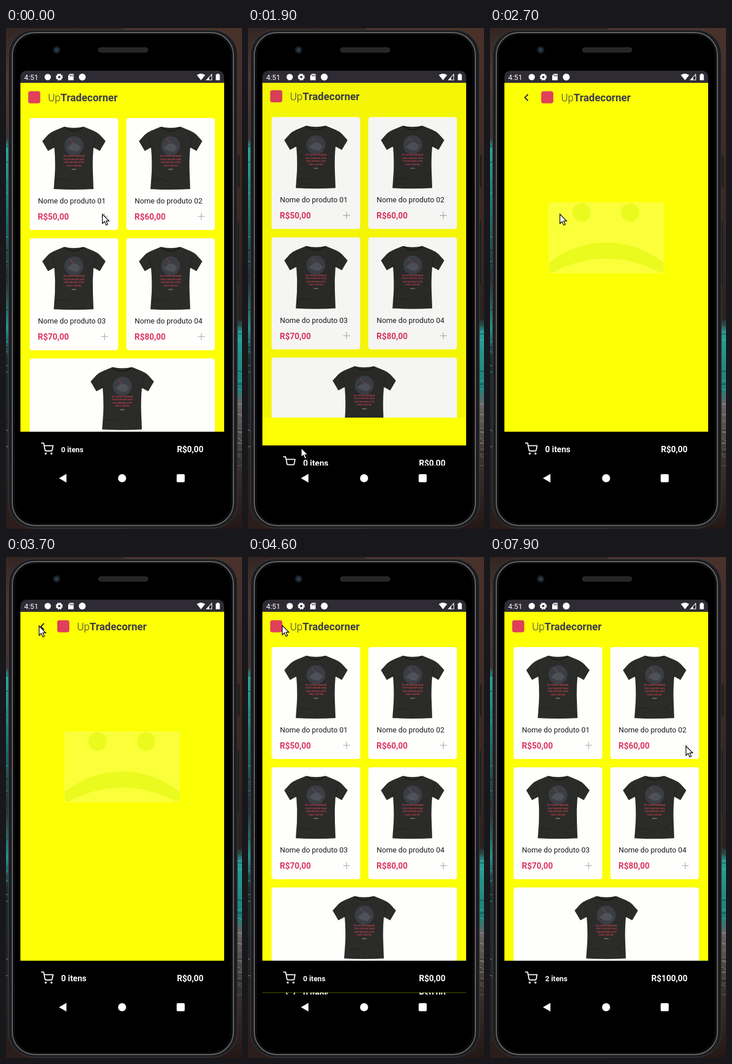
Write an HTML page that moves like this. It is 410 px wide and 868 px high and loops after 8 s.

```html
<!DOCTYPE html>
<html lang="pt">
<head>
<meta charset="utf-8">
<title>Loja</title>
<style>
html, body { margin: 0; width: 100%; height: 100%; overflow: hidden; background: #000; }
svg { display: block; width: 410px; height: 868px; font-family: Roboto, sans-serif; }
.title { font-size: 18px; font-weight: 300; fill: #3d3d4d; }
.title tspan, .price, .total { font-weight: 700; }
.name { font-size: 12.85px; fill: #1c1c22; }
.price { font-size: 14.4px; fill: #dc3560; }
.total { font-size: 14.5px; fill: #fff; }
.print { font: 700 3.5px "Liberation Sans", sans-serif; fill: #c0404f; text-anchor: middle; }
</style>
</head>
<body>
<svg id="stage" viewBox="0 0 410 868"></svg>
<script>
const LOOP = 8000, STEP = 100;
const TOP = 95, HEIGHT = 663;
const OPEN_AT = 1865, CLOSE_AT = 4230, DURATION = 438;
const YELLOW = '#fdff05';
const stage = document.getElementById('stage');

const defs = `
<linearGradient id="left" x2="0" y2="1">
  <stop offset="0" stop-color="#332622"/><stop offset=".1" stop-color="#4c3b35"/>
  <stop offset=".22" stop-color="#40332f"/><stop offset=".24" stop-color="#2aa59b"/>
  <stop offset=".4" stop-color="#1d6663"/><stop offset=".5" stop-color="#26302f"/>
  <stop offset=".6" stop-color="#2a8f87"/><stop offset=".66" stop-color="#1c2f30"/>
  <stop offset="1" stop-color="#2b1d1a"/>
</linearGradient>
<linearGradient id="right" x2="0" y2="1">
  <stop offset="0" stop-color="#4a322b"/><stop offset=".35" stop-color="#3b2822"/>
  <stop offset=".58" stop-color="#2b2220"/><stop offset=".61" stop-color="#27a098"/>
  <stop offset=".72" stop-color="#1d7f7a"/><stop offset=".75" stop-color="#6a6663"/>
  <stop offset=".87" stop-color="#3a302d"/><stop offset="1" stop-color="#241816"/>
</linearGradient>
<clipPath id="screen"><rect x="25" y="${TOP}" width="354" height="${HEIGHT}"/></clipPath>
<clipPath id="reveal"><rect id="revealBox" x="25" width="354" height="${HEIGHT}"/></clipPath>
<g id="shirt">
  <path fill="#2b2b29" d="M-17 0Q0 4 17 0L34 7Q41 10 45 14L55 25 45 42 34 36Q32 58 33 80L34 108Q0 110-35 108L-33 80Q-32 58-34 36L-45 42-55 25-45 14Q-41 10-34 7Z"/>
  <path fill="none" stroke="#1b1b1a" stroke-width="2" d="M-16 1Q0 13 16 1"/>
  <path fill="none" stroke="#1f1f1e" d="M-34 37Q-34 27-38 18M34 37Q34 27 38 18M-30 92Q-12 88-2 98M14 94Q22 90 30 82"/>
  <circle cy="33" r="16.5" fill="#3b3e44"/>
  <path fill="#4e5157" d="M-12 37L-4 30 5 29 12 36 6 43-3 42Z"/>
  <path fill="none" stroke="#b83a4a" d="M-7 21L-1 28 1 31"/>
  <g class="print">
    <text y="52">SE CHOVER AMANHÃ</text><text y="57.5">VOU FICAR EM CASA</text>
    <text y="63">COM UM BOM LIVRO</text><text y="68.5">CHÁ E UM PÃO</text>
  </g>
  <rect x="-4" y="73" width="8" height="1.5" fill="#77777a"/>
</g>
<path id="plus" fill="none" stroke="#b4b4ba" stroke-width="1.3" d="M-6 0H6M0-6V6"/>
<g id="cart" transform="translate(60.8 718.2) scale(.91)" fill="none" stroke="#fff" stroke-width="2" stroke-linecap="round" stroke-linejoin="round">
  <circle cx="9" cy="21" r="1"/><circle cx="20" cy="21" r="1"/>
  <path d="M1 1h4l2.68 13.39a2 2 0 0 0 2 1.61h9.72a2 2 0 0 0 2-1.61L23 6H6"/>
</g>`;

function backdrop() {
  let lines = '', seed = 7;
  const random = () => (seed = seed * 16807 % 2147483647) / 2147483647;
  for (let i = 0; i < 60; i++) {
    const onLeft = i % 2, y = onLeft ? 200 + random() * 560 : 510 + random() * 250;
    const colors = y > 640 ? ['#14110f', '#b5b2ae', '#77726e'] : ['#0d1516', '#48c4b8', '#176b67'];
    lines += `<path stroke="${colors[i % 3]}" stroke-opacity=".7" d="M${onLeft ? 0 : 400} ${y}l10 ${random() * 12 - 4}"/>`;
  }
  return `<rect width="410" height="868" fill="#33231f"/>
    <rect width="205" height="868" fill="url(#left)"/>
    <rect x="205" width="205" height="868" fill="url(#right)"/>${lines}`;
}

const phone = `
<rect x="400" y="220" width="5.5" height="56" rx="2" fill="#1b1b1d"/>
<rect x="400" y="334" width="5.5" height="112" rx="2" fill="#1b1b1d" stroke="#3a3a3d" stroke-width=".7"/>
<rect x="4.5" y="3.5" width="397.5" height="863" rx="43" fill="#1d1d1f" stroke="#3c3d40"/>
<rect x="11" y="8" width="384" height="854" rx="39" fill="#0b0b0c" stroke="#626366" stroke-width="2"/>
<rect x="16" y="12" width="374" height="846" rx="35" fill="#000"/>
<circle cx="88" cy="38" r="6.5" fill="#141c22"/><circle cx="88" cy="38" r="3.5" fill="#293b49"/>
<rect x="160.5" y="34" width="86" height="8" rx="4" fill="#262626" stroke="#303030"/>
<path fill="#2e2b35" d="M25 95V86Q25 74 37 74H367Q379 74 379 86V95Z"/>
<g fill="#fff">
  <text x="31.5" y="89.5" font-size="12.8">4:51</text>
  <circle cx="72.5" cy="85" r="5.5"/>
  <circle cx="92.5" cy="85" r="3.6" fill="none" stroke="#fff" stroke-width="3"/>
  <circle cx="92.5" cy="85" r="5.3" fill="none" stroke="#fff" stroke-width="1.6" stroke-dasharray="2.4 1.76"/>
  <path d="M111 79.5H117.5V90.5H108V82.5Z"/>
  <path stroke="#2e2b35" d="M111.5 81V84M113.7 81V84M115.9 81V84"/>
  <circle cx="132.5" cy="85" r="6"/>
  <path d="M331.5 81.5Q338.5 76.5 346 81.5L338.8 90.5Z"/>
  <path d="M358 79V90.5H347Z"/>
  <path fill="#2e2b35" d="M357 82V89.5H353V85.5Z"/>
  <path d="M364.5 80.5H366.5V79H369.5V80.5H371.5V90.5H364.5Z"/>
  <path d="M92 780L105 772.5V787.5Z"/><circle cx="201.7" cy="780" r="7"/>
  <rect x="296.5" y="773" width="14" height="14" rx="2"/>
</g>`;

const header = x => `
  <rect x="${x}" y="109.5" width="21" height="21" rx="4" fill="#e0405a"/>
  <text class="title" x="${x + 34.5}" y="127">Up<tspan>Tradecorner</tspan></text>`;

const footer = (id, size) => `
  <rect x="25" y="699.5" width="354" height="90" fill="#000"/>
  <use href="#cart"/>
  <text class="total" x="95.7" y="735" style="font-size:${size}px" id="${id}Items">0 itens</text>
  <text class="total" x="343" y="735" text-anchor="end" id="${id}Total">R$0,00</text>`;

function product(i) {
  const x = 41 + i % 2 * 168, y = 156 + (i >> 1) * 208.3;
  const width = i === 4 ? 322 : 154;
  return `<rect x="${x}" y="${y}" width="${width}" height="194" rx="4.5" fill="#fefefc"/>
    <use href="#shirt" x="${x + width / 2}" y="${y + 15}"/>
    <text class="name" x="${x + 14.6}" y="${y + 148}">Nome do produto 0${i + 1}</text>
    <text class="price" x="${x + 14.3}" y="${y + 176}">R$${50 + i * 10},00</text>
    <use href="#plus" id="plus${i}" x="${x + width - 23.7}" y="${y + 170.4}"/>`;
}

const home = `<g clip-path="url(#screen)"><g id="home">
  <rect x="25" y="${TOP}" width="354" height="700" fill="${YELLOW}"/>
  ${header(38.5)}${[0, 1, 2, 3, 4].map(product).join('')}${footer('home', 12.8)}
  </g><rect id="shade" x="25" y="${TOP}" width="354" height="${HEIGHT}"/></g>`;

const cartPage = `<g id="cartPage" clip-path="url(#screen)"><g clip-path="url(#reveal)"><g id="cartBody">
  <rect x="25" y="60" width="354" height="700" fill="${YELLOW}"/>
  <path d="M66 115L60.5 120.5 66 126" fill="none" stroke="#222" stroke-width="1.8"/>
  ${header(89)}
  <rect x="101.5" y="302" width="201" height="123" fill="#fbff3a"/>
  <g fill="#eafa1e"><circle cx="159" cy="319.5" r="16"/><circle cx="243.5" cy="319.5" r="16"/>
  <path d="M102 407Q148 371.5 202 371.5T302 407V419Q302 425 296 424Q250 399.5 202 399.5T108 424Q102 425 102 419Z"/></g>
  ${footer('cart', 14.5)}
  </g></g><rect id="edge" x="25" width="354" height=".7" fill="${YELLOW}" opacity=".25"/></g>`;

const cursor = `<path id="cursor" fill="#fff" stroke="#000" stroke-width="1.2"
  d="M.5 .5V16.8L4.2 13.3 7 19.5 9.7 18.3 7 12.3H12Z"/>`;

stage.innerHTML = `<defs>${defs}</defs>` + backdrop() + phone + home + cartPage + cursor;
const el = id => document.getElementById(id);

// time, x, y of the pointer
const path = [
  [0, 167, 322], [500, 167, 322], [1300, 85, 742], [1400, 86, 738], [1500, 86, 738],
  [1700, 92, 727], [2300, 92, 727], [2400, 125, 622], [2500, 125, 622], [2700, 121, 322],
  [2800, 200, 221], [2900, 249, 328], [3000, 249, 328], [3100, 202, 228], [3599, 202, 228],
  [3600, 35, 118], [3700, 57, 119], [3900, 57, 119], [4000, 56, 117], [4300, 56, 117],
  [4600, 59, 118], [5000, 189, 353], [5400, 170, 327], [7000, 170, 327],
  [7500, 255, 344], [7900, 340, 327], [8000, 340, 327]
];

function pointer(t) {
  const i = path.findIndex(key => key[0] > t);
  const [t0, x0, y0] = path[i - 1], [t1, x1, y1] = path[i];
  const k = (t - t0) / (t1 - t0);
  return [x0 + (x1 - x0) * k, y0 + (y1 - y0) * k];
}

// cubic-bezier(.35, .45, 0, 1)
function ease(x) {
  if (x <= 0) return 0;
  if (x >= 1) return 1;
  const curve = (s, a, b) => 3 * (1 - s) ** 2 * s * a + 3 * (1 - s) * s * s * b + s ** 3;
  let low = 0, high = 1;
  for (let i = 0; i < 24; i++) {
    const mid = (low + high) / 2;
    if (curve(mid, .35, 0) < x) low = mid; else high = mid;
  }
  return curve(low, .45, 1);
}

const cartProgress = t => ease((t - OPEN_AT) / DURATION) - ease((t - CLOSE_AT) / DURATION);

function draw(t) {
  const p = cartProgress(t), hidden = 1 - p;
  const edge = TOP + HEIGHT * hidden, shift = HEIGHT * .041 * hidden;
  el('home').setAttribute('transform', `translate(0 ${-HEIGHT * .02 * p})`);
  el('shade').setAttribute('opacity', .1 * Math.min(1, p / .36));
  el('cartPage').setAttribute('display', p > 0 ? 'inline' : 'none');
  el('cartBody').setAttribute('transform', `translate(0 ${shift})`);
  el('revealBox').setAttribute('y', edge);
  el('edge').setAttribute('y', edge);

  const count = t < 5800 ? 0 : t < 6700 ? 1 : 2;
  el('homeItems').textContent = `${count} itens`;
  el('homeTotal').textContent = `R$${count * 50},00`;
  el('plus0').setAttribute('opacity', t < 5400 || t >= 6900 ? 1 : t < 5800 ? .3 : .6);
  el('plus1').setAttribute('opacity', t < 7900 ? 1 : .25);

  const [x, y] = pointer(t);
  el('cursor').setAttribute('transform', `translate(${x} ${y})`);
  el('cursor').setAttribute('display', t >= 3200 && t < 3600 ? 'none' : 'inline');
}

let start;
function tick(now) {
  start ??= now;
  draw(Math.floor((now - start) % LOOP / STEP) * STEP);
  requestAnimationFrame(tick);
}
draw(0);
requestAnimationFrame(tick);
</script>
</body>
</html>
```
